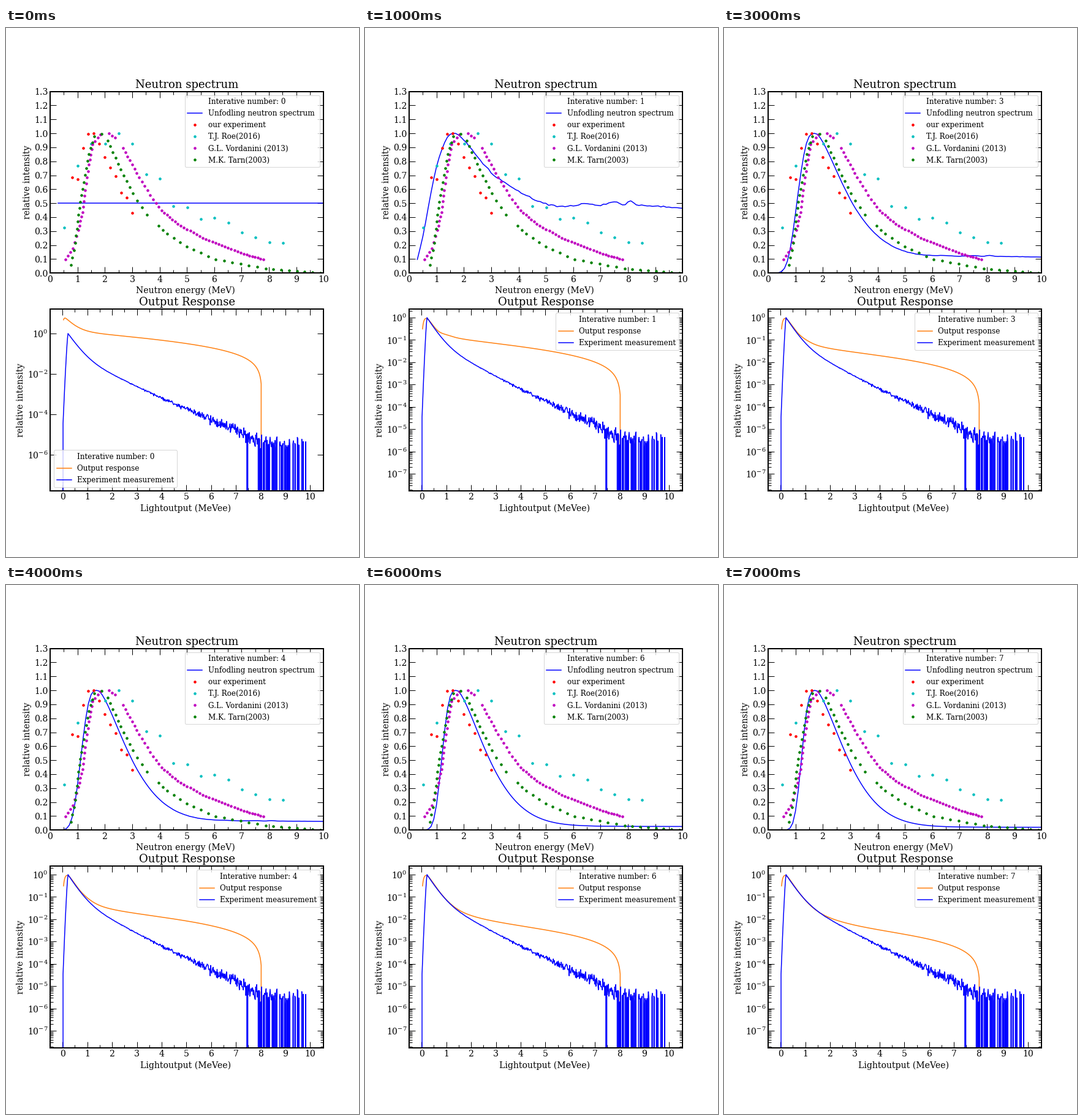
These frames come from a looping animation (576 by 864 pixels, 8 s). A matplotlib script:

```python
import numpy as np
import matplotlib.pyplot as plt
from matplotlib.animation import FuncAnimation
from matplotlib.ticker import FixedLocator, MultipleLocator, NullFormatter

plt.rcParams.update({
    "font.family": "DejaVu Serif", "mathtext.fontset": "dejavuserif",
    "font.size": 12, "axes.titlesize": 18, "axes.labelsize": 14,
    "xtick.labelsize": 14, "ytick.labelsize": 14, "legend.fontsize": 12,
    "axes.linewidth": 2, "lines.markersize": 7,
})
STEPS = 8
PEAK = 1.75   # energy where the spectrum converges to 1
EDGE = 8.05   # end of the folded response


def smooth(x, keys):
    """Cubic Hermite curve through the key points."""
    xk, yk = np.array(keys, float).T
    m = np.gradient(yk, xk)
    i = np.clip(np.searchsorted(xk, x) - 1, 0, len(xk) - 2)
    h = xk[i + 1] - xk[i]
    t = (x - xk[i]) / h
    return ((1 + 2 * t) * (1 - t) ** 2 * yk[i] + t * (1 - t) ** 2 * h * m[i]
            + t * t * (3 - 2 * t) * yk[i + 1] + t * t * (t - 1) * h * m[i + 1])


def chain(keys):
    """Dots along a path; keys are (dot index, stage x, stage y)."""
    k, x, y = np.array(keys, float).T
    dots = np.arange(k[-1] + 1)
    return ((np.interp(dots, k, x) - 72) / 44.64,
            (400.2 - np.interp(dots, k, y)) / 228.1)


# --- unfolded spectrum -------------------------------------------------
energy = np.arange(.3, 10.05, .1)


def first_guess():
    rng = np.random.default_rng(2)
    y = smooth(energy, [
        (.3, .097), (.5, .26), (.8, .575), (1, .76), (1.2, .885), (1.4, .972),
        (1.65, 1), (2, .952), (2.5, .83), (3, .72), (3.5, .645), (4, .585),
        (5, .495), (5.6, .475), (6.4, .485), (8, .488), (10, .465)])
    for centre, height, width in ((6.4, .013, .25), (7.5, .022, .2),
                                  (8.1, .028, .13)):
        y += height * np.exp(-((energy - centre) / width) ** 2)
    return y + rng.normal(0, .003, y.size) * (energy > 2)


first = first_guess()


def spectrum(n):
    """Each step shrinks the distance to the final shape by a fixed factor."""
    if n == 0:
        return np.full_like(energy, .5)
    d = np.abs(energy - PEAK)
    rising = energy < PEAK
    fall = np.exp(-.55 * d ** 1.47)
    final = np.where(rising, 0, fall + .015 * (1 - fall))
    shrink = np.where(rising, np.exp(-.74 * d ** 3.28), .47)
    y = final + (first - final) * shrink ** (n - 1)
    return y / y.max()


# --- light output -------------------------------------------------------
resp_x = np.arange(.04, 8.03, .02)


def slow(x):
    return 10 ** (-.8 - .64 * x + .01 * x * x)


def response(n):
    """A fixed fast part plus a tail that fades at every step."""
    x = resp_x
    tail = 10 ** (-.83 - .05 * x) * (1 - x / EDGE) ** .92
    if n == 0:
        y = (10 ** .97 * tail + 7 * np.exp(-x / .3)) * (1 - np.exp(-x / .04))
    else:
        fast = 10 ** (.42 - 1.79 * x) + .6 * slow(x)
        fast *= 1 - np.exp(-(x / .16) ** 1.4)
        tail *= 1 - np.exp(-(x / .8) ** 4)
        y = fast + tail * 10 ** (-.205 * (n - 1))
    return np.append(y, 0)


def measurement():
    rng = np.random.default_rng(4)
    x = np.arange(0, 9.97, .02)
    y = np.maximum(10 ** (.34 - 1.79 * x) + slow(x), 4e-6)
    rise = 10 ** (-4.45 * (np.clip(.22 - x, 0, 1) / .2) ** 1.3)
    y = np.where(x < .22, rise, y)
    spread = np.minimum(.2 * (x / 7) ** 3, .17)
    y *= 10 ** (spread * np.clip(rng.normal(0, 1, x.size), -2.5, 1.6))
    y[rng.random(x.size) < .3 * (x - 7.35)] = 0
    y[[0, -1]] = 0
    return x, y


# --- reference points ---------------------------------------------------
ours = (np.arange(.8, 3.05, .2),
        [.685, .67, .895, .995, 1, .925, .83, .755, .693, .575, .54, .43])
cyan = (np.arange(.5, 8.6, .5) + .01,
        [.325, .768, .926, .925, 1, .926, .705, .676, .477, .47, .387, .395,
         .36, .29, .255, .22, .214])
magenta = chain([
    (0, 97, 378), (3, 109, 360), (6, 118, 330), (10, 124.5, 301),
    (14, 129, 265), (18, 135, 223), (22, 141, 190), (25, 154, 173.5),
    (26, 168, 172), (28, 178, 179), (29, 191, 196), (36, 217, 243.5),
    (41, 240, 280), (44, 254, 298), (50, 280, 320), (58, 321, 343),
    (64, 352, 355.5), (71, 388, 369), (78, 419.5, 378)])
green = chain([
    (0, 106, 387), (3, 113, 351), (7, 118, 305), (11, 124.5, 263),
    (16, 135, 206), (19, 144, 177), (20, 155.5, 172.5), (21, 166, 184),
    (26, 187, 231), (30, 206.5, 270), (33, 230, 305), (34, 248.5, 323.5),
    (36, 263, 336), (39, 294.5, 357), (43, 342, 378), (49, 423.5, 393),
    (56, 513, 400)])

# --- figure --------------------------------------------------------------
fig, (top, low) = plt.subplots(2, 1, figsize=(8, 12), dpi=72)
fig.subplots_adjust(left=.125, right=.9, bottom=.125, top=.88, hspace=.2)

for ax, title, xlabel in ((top, "Neutron spectrum", "Neutron energy (MeV) "),
                          (low, "Output Response", "Lightoutput (MeVee) ")):
    ax.set_title(title)
    ax.set_xlabel(xlabel)
    ax.set_ylabel("relative intensity")
    ax.xaxis.set_major_locator(MultipleLocator(1))
    ax.xaxis.set_minor_locator(MultipleLocator(.5))
    ax.tick_params(which="both", direction="in", top=True, right=True, width=1)
    ax.tick_params(which="major", length=10)
    ax.tick_params(which="minor", length=5)

top_note, = top.plot([], [], " ")
unfolded, = top.plot([], [], "b-", label="Unfodling neutron spectrum ")
for points, color, label in ((ours, "r", "our experiment"),
                             (cyan, "c", "T.J. Roe(2016)"),
                             (magenta, "m", "G.L. Vordanini (2013)"),
                             (green, "g", "M.K. Tarn(2003)")):
    top.plot(*points, color + ".", label=label)
top.set(xlim=(0, 10), ylim=(0, 1.3))
top.yaxis.set_major_locator(MultipleLocator(.1))

low.set_yscale("log", nonpositive="clip")
low_note, = low.plot([], [], " ")
folded, = low.plot([], [], color="C1", label="Output response")
low.plot(*measurement(), "b-", label="Experiment measurement")
low.set_xlim(-.502, 10.545)

DECADES = 10.0 ** np.arange(-8, 2)
MINOR = np.outer(DECADES, np.arange(2, 10)).ravel()


def update(n):
    for note in (top_note, low_note):
        note.set_label(f"Interative number: {n}")
    unfolded.set_data(energy, spectrum(n))
    folded.set_data(np.append(resp_x, 8.03), response(n))

    start = n == 0
    lo, hi = (-7.804, 1.198) if start else (-7.765, .37)
    low.set_ylim(10 ** lo, 10 ** hi)
    low.yaxis.set_major_locator(FixedLocator(DECADES[::2] if start else DECADES))
    low.yaxis.set_minor_locator(FixedLocator([] if start else MINOR))
    low.yaxis.set_minor_formatter(NullFormatter())

    top.legend(loc="upper right")
    low.legend(loc="lower left" if start else "upper right")
    return unfolded, folded


anim = FuncAnimation(fig, update, frames=STEPS, interval=1000,
                     repeat=True, repeat_delay=0, blit=False)
plt.show()
```
